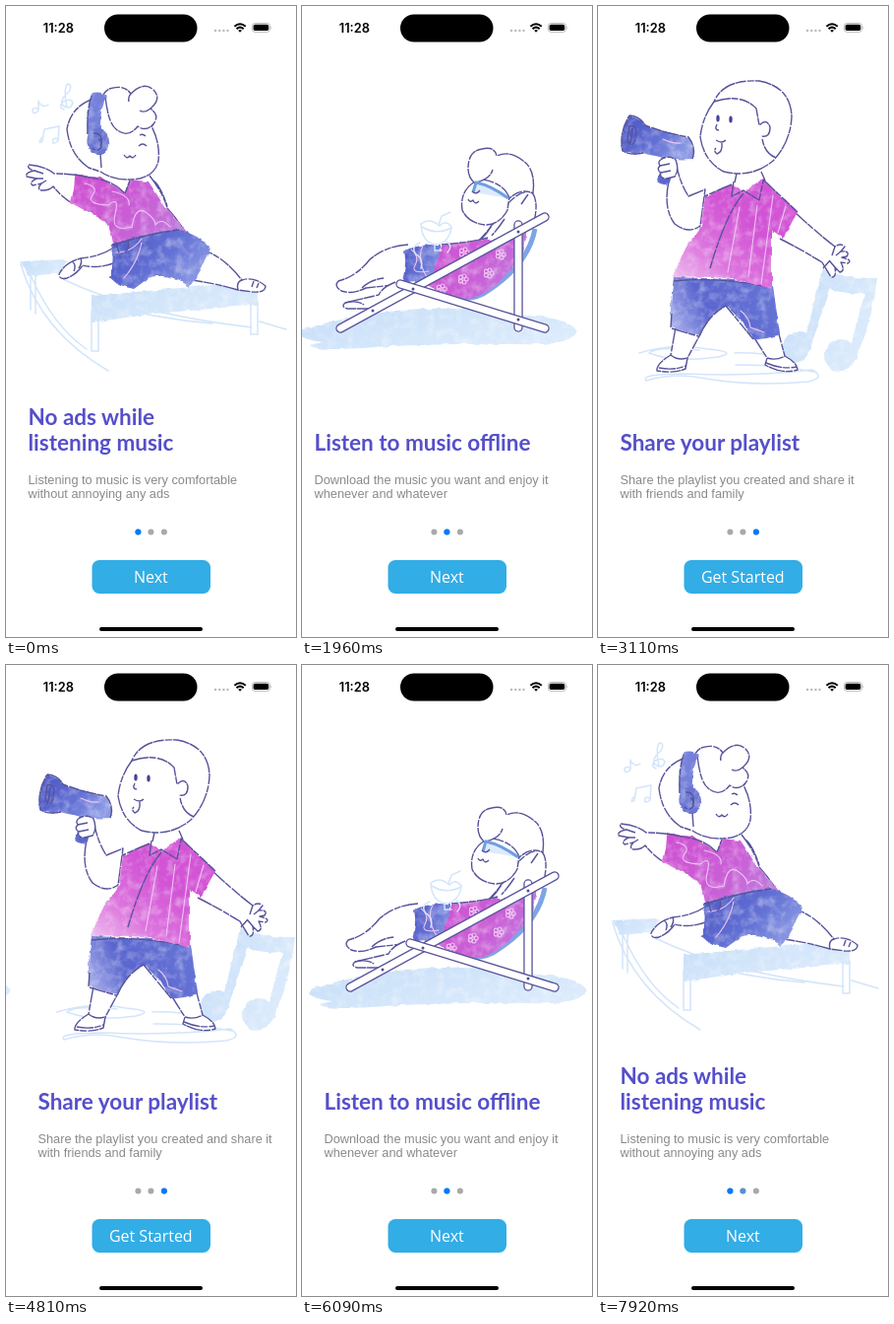
An HTML page that plays this animation: 295 px wide and 640 px high, repeating every 8 s.

```html
<!DOCTYPE html>
<html lang="en">
<head>
<meta charset="utf-8">
<title>Music onboarding</title>
<style>
  html, body { margin: 0; width: 100%; height: 100%; overflow: hidden; background: #fff; }
  svg { display: block; width: 295px; height: 640px; }
  .ink { fill: none; stroke: #57539a; stroke-width: 1.4; stroke-linejoin: round; stroke-dasharray: 17 .8 7 1.4 11 .6; }
  .skin { fill: #fff; }
  .sky { fill: none; stroke: #d3e5fa; stroke-width: 1.5; stroke-linecap: round; }
  .chalk { fill: none; stroke: #efc4f2; stroke-width: 1.1; stroke-linecap: round; }
  .title { font: 700 22.5px Lato, "Open Sans", sans-serif; fill: #554fca; }
  .body { font: 12.76px "Liberation Sans", Arial, sans-serif; fill: #8a8a8e; }
  .label { font: 16px "Open Sans", "Noto Sans", sans-serif; fill: #fff; text-anchor: middle; }
  .clock { font: 600 12.8px Inter, sans-serif; }
</style>
</head>
<body>
<svg viewBox="0 0 295 640" xmlns="http://www.w3.org/2000/svg">
  <defs>
    <linearGradient id="pink" x1="0" y1="0.2" x2="1" y2="0.7">
      <stop offset="0" stop-color="#cf50d2"/><stop offset="0.6" stop-color="#c95fd6"/><stop offset="1" stop-color="#c07ddd"/>
    </linearGradient>
    <linearGradient id="blush" x1="0.05" y1="1" x2="0.6" y2="0.4">
      <stop offset="0" stop-color="#f0c6f1"/><stop offset="0.5" stop-color="#dc74de"/><stop offset="1" stop-color="#d254d5"/>
    </linearGradient>
    <linearGradient id="blue" x1="0" y1="0.1" x2="1" y2="0.6">
      <stop offset="0" stop-color="#4c56c4"/><stop offset="0.6" stop-color="#6472d5"/><stop offset="1" stop-color="#8c9ae4"/>
    </linearGradient>
    <linearGradient id="denim" x1="0" y1="0.7" x2="1" y2="0.4">
      <stop offset="0" stop-color="#a3aaea"/><stop offset="0.35" stop-color="#5a66ce"/><stop offset="1" stop-color="#6674d6"/>
    </linearGradient>
    <linearGradient id="ice" x1="0" y1="0" x2="1" y2="0.6">
      <stop offset="0" stop-color="#c6def8"/><stop offset="1" stop-color="#dcebfc"/>
    </linearGradient>
    <filter id="watercolor" x="-5%" y="-5%" width="110%" height="110%" color-interpolation-filters="sRGB">
      <feTurbulence type="fractalNoise" baseFrequency="0.11" numOctaves="3" seed="4" result="grain"/>
      <feDisplacementMap in="SourceGraphic" in2="grain" scale="4" xChannelSelector="R" yChannelSelector="G" result="ragged"/>
      <feColorMatrix in="grain" values="0 0 0 0 1  0 0 0 0 1  0 0 0 0 1  0.8 0 0 0 -0.34"/>
      <feComposite in2="ragged" operator="in" result="bloom"/>
      <feMerge><feMergeNode in="ragged"/><feMergeNode in="bloom"/></feMerge>
    </filter>
  </defs>
  <rect width="295" height="640" fill="#fff"/>
  <g id="strip"></g>
  <g id="dots"></g>
  <rect x="87.5" y="562" width="120.5" height="34" rx="7.5" fill="#32ade6"/>
  <text id="next" class="label" x="147.3" y="585">Next</text>
  <text id="start" class="label" x="147.3" y="585">Get Started</text>

  <text class="clock" x="37.8" y="26.6">11:28</text>
  <rect x="100" y="8.5" width="94.5" height="28" rx="14"/>
  <g fill="#b9b9bb">
    <circle cx="213" cy="25" r="1.2"/><circle cx="217.3" cy="25" r="1.2"/>
    <circle cx="221.4" cy="25" r="1.2"/><circle cx="225.5" cy="25" r="1.2"/>
  </g>
  <g fill="none" stroke="#000" stroke-width="2">
    <path d="M232.4 20.8Q238 15.8 243.8 20.8M234.5 23.2Q238 20 241.7 23.2"/>
    <path d="M238 26.8L236.2 24.8Q238 23.3 240 24.8Z" fill="#000" stroke="none"/>
  </g>
  <rect x="250.4" y="17.5" width="18" height="8.8" rx="2.8" fill="none" stroke="#a5a5a5" stroke-width=".8"/>
  <rect x="251.6" y="18.7" width="15.6" height="6.4" rx="1.8"/>
  <path d="M269.6 20.4Q271.4 22 269.6 23.5Z" fill="#a5a5a5"/>
  <rect x="95" y="630" width="105" height="4" rx="2"/>
</svg>
<script>
const WIDTH = 295, LOOP = 8000;
const byId = id => document.getElementById(id);

const path = (cls, d) => `<path class="${cls}" d="${d}"/>`;
const ink = d => path('ink', d);
const skin = d => path('ink skin', d);
const sky = d => path('sky', d);
const chalk = d => path('chalk', d);
const wash = (fill, d) => `<path d="${d}" fill="${fill}" filter="url(#watercolor)"/>`;
const beam = (x1, y1, x2, y2) => {
  const d = `M${x1} ${y1}L${x2} ${y2}`;
  return `<g stroke-linecap="round"><path d="${d}" stroke="#57539a" stroke-width="9.4"/>
    <path d="${d}" stroke="#fff" stroke-width="6.8"/></g>`;
};
const pin = (x, y) => `<circle cx="${x}" cy="${y}" r="1.5" fill="#504c94"/>`;
const flower = (x, y) => [0, 1, 2, 3, 4].map(i => {
  const a = i * Math.PI * 0.4;
  return `<circle class="chalk" cx="${x + 3.2 * Math.cos(a)}" cy="${y + 3.2 * Math.sin(a)}" r="2"/>`;
}).join('');
const lines = (cls, x, y, gap, rows) =>
  rows.map((row, i) => `<text class="${cls}" x="${x}" y="${y + i * gap}">${row}</text>`).join('');
const copy = (title, body) =>
  lines('title', 22.5, 451.3 - 26.6 * (title.length - 1), 26.6, title) + lines('body', 22.5, 484.6, 14.2, body);

const leaping = () => [
  // bench and floor
  wash('url(#ice)', 'M15 259L61 257L57 271L21 274Z'),
  sky('M15 262Q35 330 104 370M25 273Q48 325 82 348M25 273V308M30 273V312M58 277Q130 312 250 326M94 301Q150 317 210 322M258 320L285 328'),
  wash('url(#ice)', 'M87 294L256 279V303L150 312L87 321Z'),
  sky('M87 309V350H94V310M249 302V333H256V300'),
  // arms and legs
  skin('M76 172Q61 170 49 170Q39 162 23 161Q21 165 29 167Q19 169 21 173L31 175Q23 179 27 182L36 180Q30 187 38 187Q44 187 48 183Q57 194 67 200'),
  ink('M29 167L38 170M31 175L38 175M36 180L41 177'),
  skin('M108 246Q96 254 76 256Q60 260 54 272Q54 278 62 276Q72 272 78 263Q94 267 112 260'),
  ink('M76 256Q78 260 74 266M67 259Q72 262 69 269'),
  skin('M194 246Q218 250 240 278Q252 274 264 284Q264 291 251 290L236 288Q212 281 188 278'),
  ink('M240 278Q234 280 236 288M257 281L255 286M252 279L250 285'),
  ink('M146 172Q160 190 164 205Q173 215 181 227M150 177Q157 182 164 203'),
  // clothes
  wash('url(#pink)', 'M70 171L96 174Q106 179 121 190L126 176L145 178Q153 190 161 203L185 230L174 229L109 242Q107 222 94 214Q82 208 66 199Q70 184 70 171Z'),
  chalk('M80 180Q95 183 88 192T104 202Q116 192 111 211T128 224Q132 202 142 209T152 222Q158 214 167 224M108 188Q127 192 125 202'),
  ink('M70 171L96 176Q111 179 121 190L126 177'),
  wash('url(#blue)', 'M107 241L137 233L174 226Q195 231 208 246Q198 267 187 285Q165 269 145 276L130 287Q114 284 105 275Q111 260 107 241Z'),
  chalk('M112 250Q128 250 138 236M120 276Q134 260 138 240'),
  ink('M107 243Q140 232 176 227M112 240L115 250M124 238Q126 246 121 250'),
  // head
  skin('M89 94Q66 102 62 125Q65 151 84 164L96 168Q112 179 136 175Q152 171 155 157Q157 139 148 122Q158 112 147 104Q159 94 150 85Q140 76 127 89Q120 79 105 84Q98 88 98 95'),
  ink('M101 92Q104 119 112 125Q124 135 134 122Q142 128 150 120M127 89Q124 92 125 97M147 104Q141 109 136 106'),
  ink('M135 142Q139 138 143 142M120 151Q123 156 126 152Q129 156 132 151M136 131Q139 129 142 132'),
  wash('#7480da', 'M83 130Q82 105 87 89Q95 85 103 92Q95 103 96 128Z'),
  wash('#6875d2', 'M85 127Q95 120 103 130Q109 145 99 150Q87 154 83 142Q81 134 85 127Z'),
  ink('M83 130Q82 105 87 91M89 129Q99 128 97 143Q93 149 88 144M94 135Q99 137 96 142M96 150L97 164'),
  // notes
  `<g stroke-width="2.2">${sky('M33 96V106Q27 112 27 105Q29 102 33 105M33 97Q37 104 43 100M39 125L37 137Q32 141 36 134M39 125L54 122L53 137Q46 142 48 135Q51 133 53 136M59 105Q53 103 58 97Q66 93 68 98Q66 106 58 101Q54 95 64 87Q68 80 63 79Q58 82 62 103')}</g>`,
  copy(['No ads while', 'listening music'], ['Listening to music is very comfortable', 'without annoying any ads'])
].join('');

const lounging = () => [
  wash('url(#ice)', 'M8 329Q50 316 105 309Q170 303 240 313Q286 318 290 331Q281 345 232 343Q142 342 70 347Q25 350 18 344L30 341Q3 337 8 329Z'),
  // fabric
  `<path d="M247 226Q240 264 194 292Q180 299 162 296" fill="none" stroke="#7da5e6" stroke-width="5"/>`,
  // legs
  skin('M118 242Q96 243 79 257Q66 274 47 279Q42 284 50 289Q61 293 75 286L112 282'),
  skin('M105 280Q92 285 88 293L54 301Q49 305 56 307L88 307Q101 303 114 286'),
  ink('M54 301Q66 298 73 303M71 286Q80 277 94 276'),
  // arm, face and hair
  skin('M186 242Q203 225 215 206Q231 185 244 189Q251 198 246 219L230 236'),
  skin('M186 178Q170 188 173 207Q179 220 196 222Q211 222 219 207L222 186'),
  skin('M186 180Q179 174 179 165Q179 147 193 145Q206 142 208 152Q221 146 235 157Q248 166 245 190Q233 184 221 195Q216 180 194 176'),
  ink('M187 179Q201 176 204 166M203 222Q199 230 193 236M216 216Q210 225 203 233M240 191L233 201'),
  `<path d="M184 189L187 179Q202 182 220 195" fill="#dcebfc" stroke="#6f9fe2" stroke-width="3"/>`,
  ink('M183 188Q187 192 191 187M179 196Q181 200 184 197Q186 202 190 198'),
  // clothes
  wash('url(#blue)', 'M114 249Q122 242 150 242L150 262L135 280Q123 280 111 281Q117 264 114 249Z'),
  chalk('M121 247Q130 254 125 263T139 269M133 243Q126 257 137 275'),
  wash('url(#pink)', 'M152 243Q181 238 200 237L224 234L238 226Q240 253 216 274Q202 293 178 297Q153 294 136 282Q149 260 152 243Z'),
  flower(175, 250), flower(174, 277), flower(200, 271), flower(152, 287), flower(212, 252),
  ink('M152 242Q180 240 199 235'),
  // coconut
  `<g stroke-width="2">${path('sky skin', 'M131 221Q132 240 146 242Q160 240 162 224Q156 216 150 223Q140 214 131 221Z')}
   ${sky('M132 224Q146 233 162 225M149 222L152 213L161 209M145 242V248H152')}</g>`,
  sky('M130 240Q120 244 126 252Q134 256 131 266M157 239Q164 243 158 250'),
  // chair frame
  beam(230, 222, 230, 326), beam(49, 327, 257, 214), beam(110, 282, 257, 327),
  pin(230, 229), pin(230, 318), pin(123, 287), pin(82, 309),
  copy(['Listen to music offline'], ['Download the music you want and enjoy it', 'whenever and whatever'])
].join('');

const shouting = () => [
  sky('M42 352Q78 341 112 348Q144 351 122 356Q78 362 52 352Q60 345 103 349M49 380Q42 373 90 373Q158 376 218 369Q232 377 214 381Q158 386 110 378Q79 371 49 380M140 364Q180 363 219 371M192 357Q163 351 139 352'),
  // note
  wash('url(#ice)', 'M228 267Q254 277 284 276Q279 318 264 354Q257 374 238 370Q224 358 235 343Q246 334 258 341L271 292Q249 292 235 287L216 347Q208 368 191 361Q182 347 193 334Q203 328 212 333Z'),
  // arms
  skin('M79 157Q82 177 92 193L109 186L104 223Q92 232 78 221Q66 205 72 178'),
  skin('M200 209Q225 232 241 244Q247 240 251 244L247 249Q257 248 253 254L248 255Q260 258 254 261L247 260Q252 269 246 270L241 265Q243 276 237 275L228 260Q207 247 185 236'),
  ink('M241 244L238 253M247 249L242 253M236 258L229 266M241 265L236 259'),
  // legs
  skin('M79 326L74 354Q59 363 60 370Q77 373 89 368L91 357L104 333'),
  skin('M158 335L172 357L170 364Q187 374 203 369Q203 362 190 355L183 329'),
  ink('M74 354Q81 360 91 357M172 357Q181 360 190 355M62 367Q77 370 89 365M171 362Q187 369 202 366'),
  // clothes
  wash('url(#denim)', 'M77 275L130 277L178 284L185 333Q170 339 158 338L146 319L130 304Q112 315 103 335L74 326Q73 299 77 275Z'),
  ink('M77 279Q126 274 177 286M103 335Q112 314 130 304L158 338M75 327L102 335M75 312L74 326'),
  chalk('M145 309Q154 316 155 326L169 331'),
  wash('url(#blush)', 'M136 181L150 188L168 176L203 209L188 236L177 228L177 287L150 280Q126 273 76 275L88 247L105 223L109 193Z'),
  chalk('M162 202L153 275M178 192L166 282M144 204L132 270M191 203L183 230'),
  ink('M136 181L108 193M168 176L203 209M148 190Q130 211 114 266M138 178L136 193L148 187L164 197L168 177'),
  // head
  skin('M118 97Q106 113 104 133Q108 158 128 168Q157 175 178 157Q196 138 197 112Q196 82 164 76Q128 74 118 97'),
  ink('M118 97Q146 88 161 104L164 121Q172 113 175 123Q175 134 166 132M181 154Q169 149 167 134M141 170L139 179M166 168L170 177'),
  ink('M120 136Q126 140 130 136M126 139Q127 148 121 150Q117 147 120 144M121 120Q118 126 123 126'),
  `<g fill="#44419a"><ellipse cx="122" cy="114" rx="1.7" ry="3.6"/><ellipse cx="135" cy="115" rx="1.7" ry="3.6"/></g>`,
  // megaphone
  wash('#5a66cb', 'M65 151L60 178Q66 183 72 180L79 152Z'),
  wash('url(#blue)', 'M32 111Q43 112 48 121Q69 129 92 133Q100 143 96 155Q72 157 46 149Q34 152 25 147Q21 128 32 111Z'),
  ink('M32 111Q43 112 48 121Q69 129 92 133Q100 143 96 155M46 149Q34 152 25 147Q21 128 32 111M32 122Q41 119 38 136Q33 146 30 135ZM35 124L33 139'),
  chalk('M66 135Q76 140 84 139'),
  skin('M65 155Q60 158 63 162Q59 166 64 169Q62 175 70 175L78 173Q83 166 79 156Q73 151 65 155Z'),
  ink('M63 162L73 160M64 169L74 167'),
  copy(['Share your playlist'], ['Share the playlist you created and share it', 'with friends and family'])
].join('');

byId('strip').innerHTML = [leaping, lounging, shouting]
  .map((draw, i) => `<g transform="translate(${i * WIDTH})">${draw()}</g>`).join('');
byId('dots').innerHTML = [134.4, 147.4, 160.9].map(x =>
  `<circle cx="${x}" cy="533.5" r="3" fill="#a9a9ac"/><circle class="on" cx="${x}" cy="533.5" r="3" fill="#007aff"/>`).join('');
const lit = [...document.querySelectorAll('.on')];

// pulls: [time, finger travel]; mark: glide step at which the page indicator changes
const swipes = [
  { from: 0, to: 1, pulls: [[500, 10]], release: 780, settle: 1310, steps: 6, mark: 4 },
  { from: 1, to: 2, pulls: [[1960, 10]], release: 2330, settle: 3110, steps: 8, mark: 6 },
  { from: 2, to: 1, pulls: [[4810, 10], [4940, 14]], release: 5240, settle: 5980, steps: 8, mark: 6 },
  { from: 1, to: 0, pulls: [[6990, 10], [7090, 14]], release: 7460, settle: 7920, steps: 5, mark: 4 }
];

function pose(t) {
  const swipe = swipes.filter(s => t >= s.pulls[0][0]).pop();
  if (!swipe) return { scroll: 0, from: 0, to: 0, mix: 1 };
  const { from, to, pulls, release, settle, steps, mark } = swipe;
  let travel = pulls.filter(p => t >= p[0]).pop()[1], mix = 0;
  if (t >= release) {
    const step = Math.floor((t - release) / (settle - release) * (steps - 1) + 0.02);
    const left = step >= steps - 1 ? 0 : (WIDTH - travel) * 0.5 ** (step + 1);
    travel = WIDTH - left;
    mix = step < mark ? 0 : step === mark ? 0.5 : 1;
  }
  return { scroll: from * WIDTH + (to - from) * travel, from, to, mix };
}

function render(t) {
  const { scroll, from, to, mix } = pose(t);
  byId('strip').setAttribute('transform', `translate(${-Math.round(scroll)})`);
  lit.forEach((dot, i) => {
    const level = i === to ? Math.min(1, mix * 2) : i === from ? 1 - mix : 0;
    dot.setAttribute('opacity', level);
  });
  const last = to === 2 ? mix : from === 2 ? 1 - mix : 0;
  byId('start').setAttribute('opacity', last);
  byId('next').setAttribute('opacity', 1 - last);
}

const begin = performance.now();
function tick() {
  render((performance.now() - begin) % LOOP);
  requestAnimationFrame(tick);
}
tick();
</script>
</body>
</html>
```
